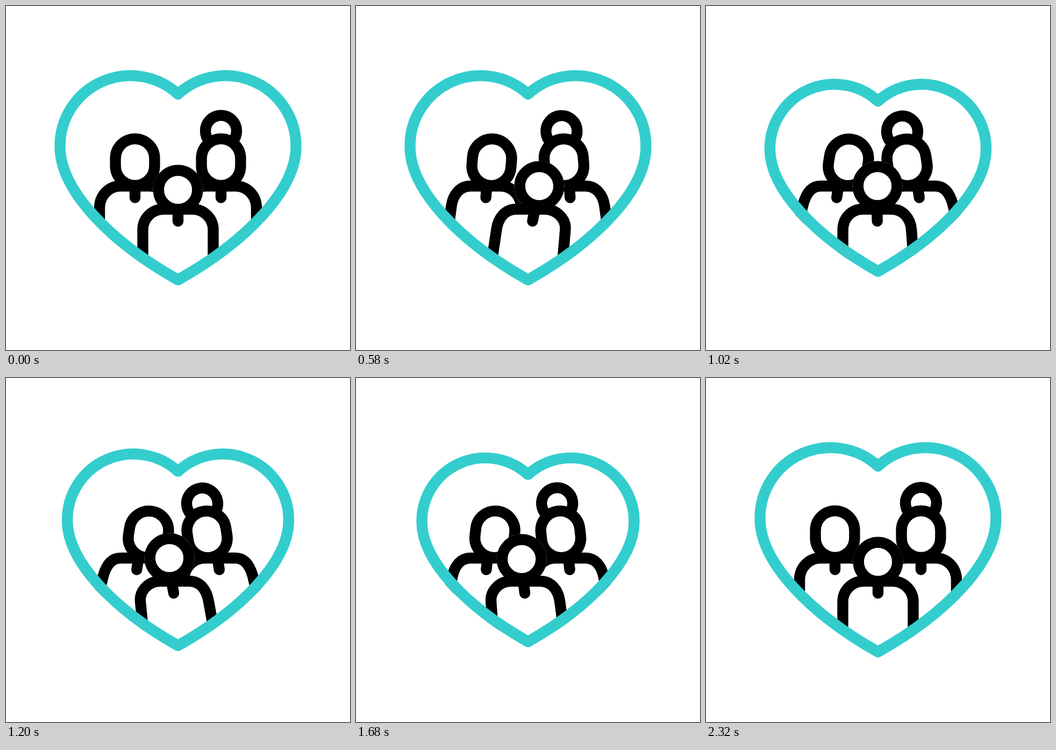
An HTML page with a canvas that plays this animation: 640 by 640 pixels, repeating every 2400 ms.

```html
<!DOCTYPE html>
<html lang="en">
<head>
<meta charset="utf-8">
<title>Family heart</title>
<style>
  html, body { margin: 0; width: 100%; height: 100%; overflow: hidden; background: #fff; }
  canvas { display: block; }
</style>
</head>
<body>
<canvas id="stage" width="640" height="640"></canvas>
<script>
const ctx = document.getElementById('stage').getContext('2d');
const LOOP = 2400, LINE = 20.4;

// Linear progress from a to b, held outside that span
const ramp = (t, a, b) => Math.min(1, Math.max(0, (t - a) / (b - a)));
const mix = (from, to, k) => from.map((v, i) => v + (to[i] - v) * k);

const heart = new Path2D(
  'M0-156 A131 131 0 0 0-219.5-58.5 C-219.5 22.7-126.3 118.7 0 189.5' +
  'C126.3 118.7 219.5 22.7 219.5-58.5 A131 131 0 0 0 0-156Z');
const head = new Path2D('M-36.4-7 a36.4 36.4 0 0 1 72.8 0 v14 a36.4 36.4 0 0 1-72.8 0Z');

// Parent: foot x, hip x, hip y, two curve controls, inner shoulder, inner hip, collar top, collar tip
const upright = [-66, -66, 376, -66, 353, -49, -27, 27, 66, 0, 0];
const leaning = [-68, -59, 368, -53, 347, -43, -27, 30, 69, 6.5, 3.2];

// Child: head x, head y, collar top, collar tip, left hip, left shoulder, right shoulder, right hip
const rest = [320, 342, 320, 320, 254.5, 293, 347, 385.5];
const right = [341.2, 335, 333, 328.5, 261.5, 298, 351, 389.5];
const left = [304, 335, 308, 312, 250, 287, 341, 377];

function paint(path) {
  ctx.fill(path);
  ctx.stroke(path);
}

function circle(x, y, r) {
  const path = new Path2D();
  path.arc(x, y, r, 0, Math.PI * 2);
  return path;
}

function drawParent(x, side, lean, reach, hasBun) {
  const [foot, hip, hipY, c1, c1y, c2, shoulder, inner, innerHip, top, tip] = mix(upright, leaning, lean);
  ctx.save();
  ctx.translate(x, 0);
  ctx.scale(side, 1);
  paint(new Path2D(
    `M${foot} 405 L${hip} ${hipY} C${c1} ${c1y} ${c2} 335 ${shoulder} 335 H${inner}` +
    `C${inner + 22} 335 ${innerHip} 353 ${innerHip} 376 V405`));
  ctx.stroke(new Path2D(`M${top} 335 L${tip} 356.6`));
  ctx.translate(reach * lean, 290.5 + 0.4 * lean);
  ctx.rotate(lean * 9 * Math.PI / 180);
  if (hasBun) paint(circle(0, -58, 29));
  paint(head);
  ctx.restore();
}

function drawChild(pose) {
  const [x, y, top, tip, hipL, shL, shR, hipR] = pose;
  const swayL = hipL - rest[4], swayR = hipR - rest[7];
  ctx.fill(circle(x, y, 46.5));
  // Legs turn about fixed points, and the shoulders curve on along them
  paint(new Path2D(
    `M${rest[4] - swayL * 0.17} 470 L${hipL} 416 C${hipL + swayL * 0.4} 395 ${shL - 21} 378 ${shL} 378 H${shR}` +
    `C${shR + 21} 378 ${hipR + swayR * 0.4} 395 ${hipR} 416 L${rest[7] - swayR * 0.17} 470`));
  ctx.stroke(new Path2D(`M${top} 378 L${tip} 400.3`));
  paint(circle(x, y, 36.3));
}

function scaledHeart(scale) {
  const path = new Path2D();
  path.addPath(heart, new DOMMatrix([scale, 0, 0, scale, 320, 320]));
  return path;
}

function draw(t) {
  const back = ramp(t, 1455, 2315);
  const lean = ramp(t, 286, 872) * (1 - back);
  const sway = mix(mix(rest, right, ramp(t, 0, 588)), left, ramp(t, 788, 1180));

  // Two triangular beats
  const beat = ramp(t, 786, 1962) * 4 % 2;
  const scale = 1 - 0.105 * (1 - Math.abs(1 - beat));

  ctx.fillStyle = '#fff';
  ctx.fillRect(0, 0, 640, 640);
  ctx.lineWidth = LINE;
  ctx.lineCap = ctx.lineJoin = 'round';

  ctx.save();
  ctx.clip(scaledHeart(Math.min(1, scale + 0.063)));
  ctx.strokeStyle = '#000';
  drawParent(240, 1, lean, 24.9, false);
  drawParent(400, -1, lean, 25.9, true);
  drawChild(mix(sway, rest, back));
  ctx.restore();

  ctx.strokeStyle = '#33cdce';
  ctx.stroke(scaledHeart(scale));
}

function tick() {
  draw(performance.now() % LOOP);
  requestAnimationFrame(tick);
}
tick();
</script>
</body>
</html>
```
